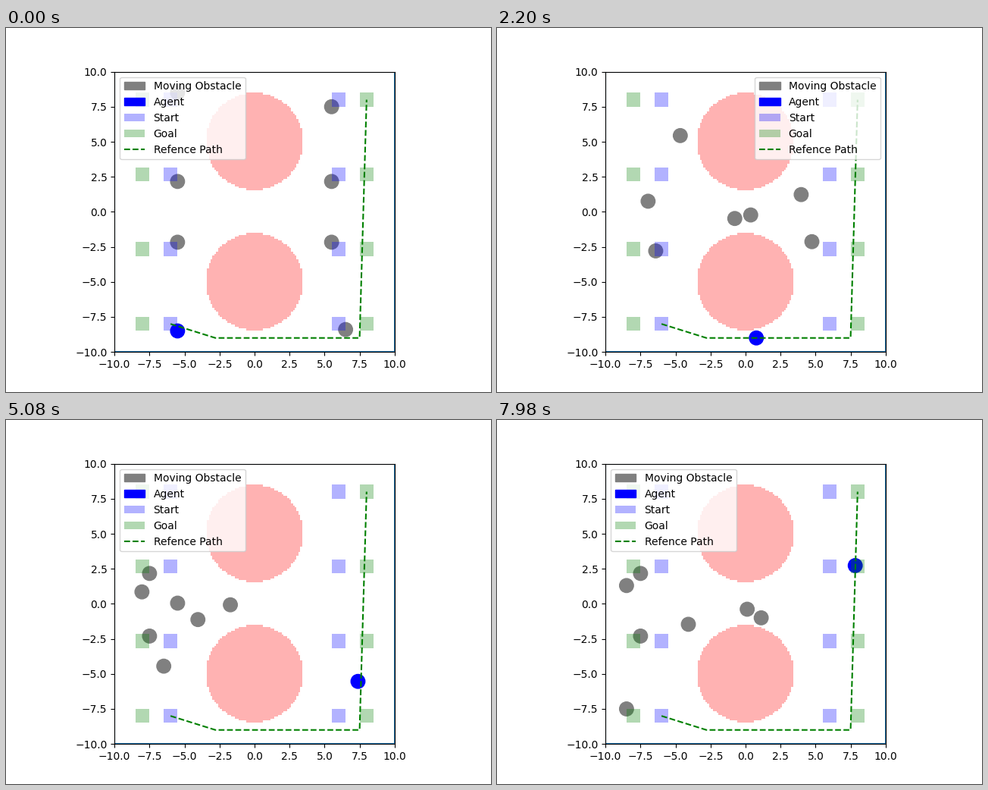
Animation, 640 px wide and 480 px high, one loop 8 s. Source, as a matplotlib script:

```python
import numpy as np
import matplotlib.pyplot as plt
from matplotlib.animation import FuncAnimation
from matplotlib.patches import Circle, Rectangle

FRAMES, STEP = 320, 25
PACE = 2.85             # units per second along the longer axis
RADIUS = 0.5
LEGEND_BOTTOM = 3.755
ROW = 8 / 3
SHELF = ROW - 0.5       # height where the inner robots set off

now = np.arange(FRAMES) * STEP / 1000


def route(*corners, timed=()):
    """Straight legs at full pace; `timed` gives (leg, seconds) for slow ones."""
    corners = np.array(corners)
    legs = np.abs(np.diff(corners, axis=0)).max(axis=1) / PACE
    for leg, seconds in timed:
        legs[leg] = seconds
    t = np.append(0, legs.cumsum())
    return np.column_stack([np.interp(now, t, axis) for axis in corners.T])


agent_track = route((-5.5, -8.5), (-2.8, -9), (3.6, -9), (6.2, -8.3),
                    (7.4, -5.5), (7.95, 5))

top_left = route((-5.5, 8.5), (-3.93, 2.77), (-6.1, -1), (1.5, -1),
                 timed=[(0, 4.12)])
top_right = route((5.5, 7.5), (3.92, 1.02), (-4, -1.06), (-8.5, -7.5))
upper_left = route((-5.5, SHELF), (-8.5, -0.73), (-8, 1), (-5.3, -0.74),
                   (0.5, -0.36), timed=[(0, 4.52)])
upper_right = route((5.5, SHELF), (4.05, 0.83), (-7.5, -2.3))
lower_left = route((-5.5, -SHELF), (-7.2, -3.32), (-5.53, -5.95), (-4, -1.2),
                   timed=[(0, 4.08), (1, 2.32)])
lower_right = route((5.5, -SHELF), (4.3, -1.42), (-7.5, SHELF),
                    timed=[(0, 0.82)])
bottom_right = route((6.5, -8.4), (7.16, -7.1), (5.65, -4.4), (4.3, -1.05),
                     (-8.5, 1.03), (-8.5, 3), timed=[(3, 5.3)])
tracks = [top_left, top_right, upper_left, upper_right,
          lower_left, lower_right, bottom_right]


def add_disc(color):
    return ax.add_patch(Circle((0, 0), RADIUS, color=color))


def add_square(x, y, color):
    return ax.add_patch(Rectangle((x - 0.5, y - 0.5), 1, 1, facecolor=color,
                                  edgecolor="none", lw=0, alpha=0.3))


fig, ax = plt.subplots(figsize=(6.4, 4.8), dpi=100)

# Static obstacles, sampled on a grid of points
points = np.linspace(-10, 10, 151)
gx, gy = np.meshgrid(points, points)
grid = np.ones((151, 151, 4))
grid[..., 1:3] = 0.7
grid[..., 3] = np.hypot(gx, np.abs(gy) - 5) < 3.45
edge = 10 + 10 / 150
ax.imshow(grid, extent=(-edge, edge, -edge, edge), origin="lower",
          interpolation="nearest")

ax.plot([-10, 10, 10, -10, -10], [-10, -10, 10, 10, -10], color="tab:blue")

discs = [add_disc("gray") for _ in tracks]
agent = add_disc("blue")
for row in np.linspace(8, -8, 4):
    for side in (-1, 1):
        start = add_square(6 * side, row, "blue")
        goal = add_square(8 * side, row, "green")

path, = ax.plot([-6, -2.8, 7.5, 8], [-8, -9, -9, 8], "g--")

ax.set_xlim(-10, 10)
ax.set_ylim(-10, 10)
ax.set_aspect("equal")

handles = [discs[0], agent, start, goal, path]
labels = ["Moving Obstacle", "Agent", "Start", "Goal", "Refence Path"]
legend_left = ax.legend(handles, labels, loc="upper left")
ax.add_artist(legend_left)
legend_right = ax.legend(handles, labels, loc="upper right")


def update(i):
    agent.center = agent_track[i]
    for disc, track in zip(discs, tracks):
        disc.center = track[i]
    # The legend keeps to the corner that hides fewer discs
    left_busy = top_left[i, 1] + RADIUS > LEGEND_BOTTOM
    right_free = top_right[i, 1] - RADIUS < LEGEND_BOTTOM
    on_right = bool(left_busy and right_free)
    legend_right.set_visible(on_right)
    legend_left.set_visible(not on_right)
    return [agent, *discs, legend_left, legend_right]


anim = FuncAnimation(fig, update, frames=FRAMES, interval=STEP,
                     init_func=lambda: update(0), repeat=True,
                     repeat_delay=0, blit=False)
plt.show()
```
